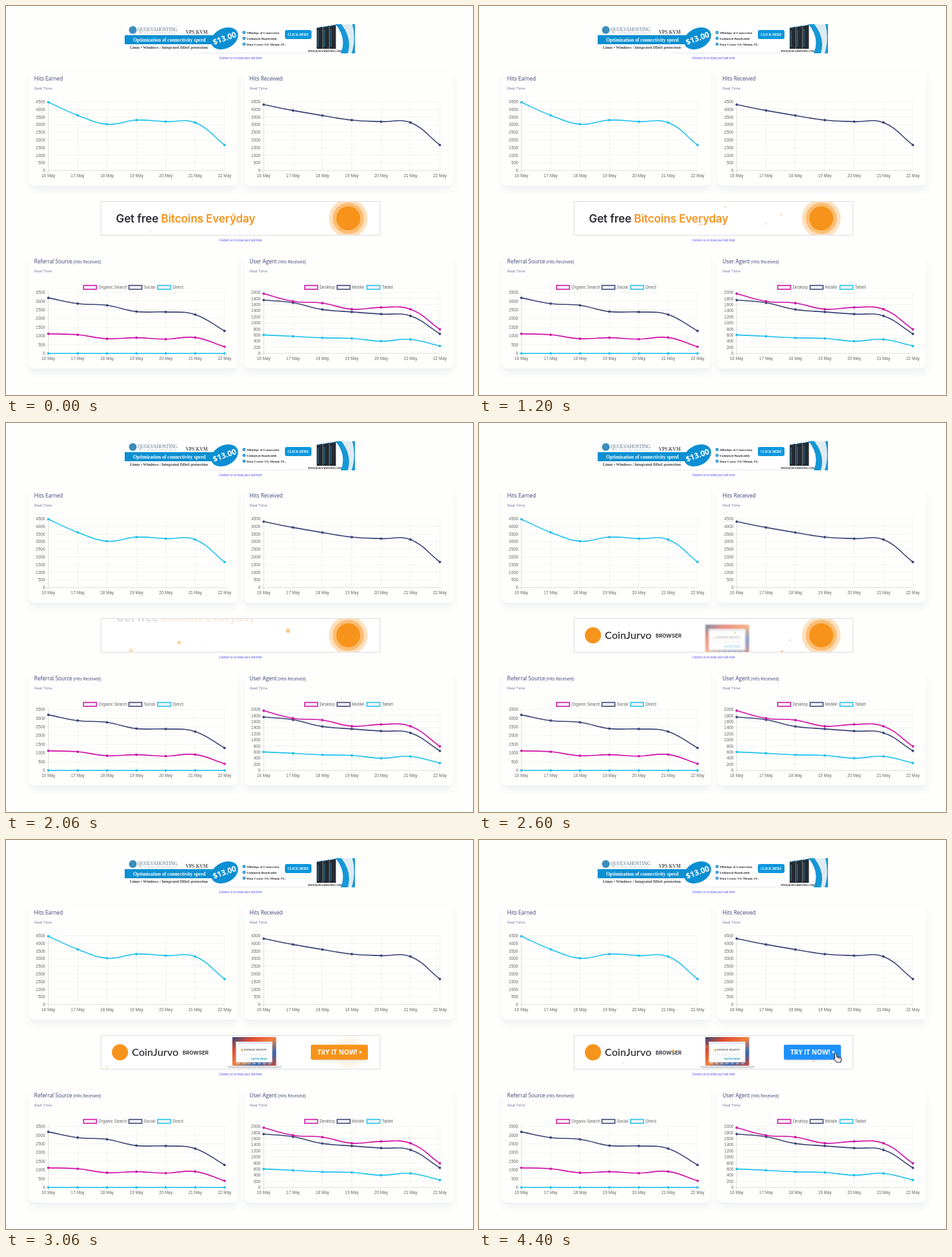
Recreate the animation shown at these times as an HTML page. Size 720x600 px, loop 4460 ms.

```html
<!DOCTYPE html>
<html lang="en">
<head>
<meta charset="utf-8">
<title>Traffic dashboard</title>
<style>
  html, body { margin: 0; width: 100%; height: 100%; overflow: hidden; background: #fefefc; }
  svg { display: block; }
  text { white-space: pre; }
  .ui { font-family: "Open Sans", sans-serif; }
  .title { font-size: 8.2px; font-weight: 500; fill: #3a4374; }
  .title tspan { font-size: 6.3px; }
  .tick { font-family: "Liberation Sans", Arial, sans-serif; font-size: 6.4px; fill: #666; }
  .serif { font-family: "Liberation Serif", serif; font-weight: 700; }
  .link { font: italic 4.5px "Open Sans", sans-serif; fill: #3c3cf5; text-anchor: middle; }
  .lead { font: 600 17px Inter, sans-serif; letter-spacing: -.1px; }
</style>
</head>
<body>
<svg width="720" height="600" viewBox="0 0 720 600">
  <defs>
    <filter id="soft" x="-10%" y="-10%" width="120%" height="125%">
      <feDropShadow dx="0" dy="7" stdDeviation="5" flood-color="#54609c" flood-opacity=".085"/>
    </filter>
    <filter id="blur"><feGaussianBlur id="blurAmount" stdDeviation="0"/></filter>
    <clipPath id="adClip"><rect x="147" y="302" width="429" height="51"/></clipPath>
    <clipPath id="topClip"><rect x="183" y="28" width="355" height="45"/></clipPath>
    <linearGradient id="screen" x1="0" y1="0" x2="1" y2="1">
      <stop offset="0" stop-color="#2b4a7e"/><stop offset=".25" stop-color="#e04a32"/>
      <stop offset=".5" stop-color="#f0823c"/><stop offset=".75" stop-color="#2f68b0"/>
      <stop offset="1" stop-color="#d8432f"/>
    </linearGradient>
  </defs>

  <g id="cards" fill="#fefefd" filter="url(#soft)"></g>

  <g clip-path="url(#topClip)">
    <rect x="183" y="28" width="355" height="45" fill="#fff"/>
    <path d="M297 72.600H476" stroke="#ddd" stroke-width=".8"/>
    <circle cx="195.500" cy="37" r="6" fill="#3c8dbb"/>
    <rect x="183" y="45" width="142" height="14" fill="#0c8fd1"/>
    <g class="serif" fill="#3d3d45">
      <text x="203" y="38.500" font-size="7.300" font-weight="400" fill="#587286">QUOLVAHOSTING</text>
      <text x="203" y="42" font-size="2.700" font-weight="400" fill="#687680">VIRTUAL AND DEDICATED SERVER SOLUTIONS</text>
      <text x="277" y="42.500" font-size="7.400" fill="#555">VPS KVM</text>
      <text x="196" y="54.700" font-size="7.550" fill="#fff">Optimization of connectivity speed</text>
      <text x="191" y="65.800" font-size="6">Linux • Windows / Integrated DDoS protection</text>
    </g>
    <ellipse cx="337" cy="50" rx="22" ry="15.500" fill="#0b8fd3" transform="rotate(-27 337 50)"/>
    <text class="ui" x="337" y="54" font-size="12" font-weight="700" fill="#fff" text-anchor="middle" transform="rotate(-20 337 50)">$13.00</text>
    <g id="perks" class="serif" font-size="5" fill="#25252c"></g>
    <rect x="430" y="37" width="41" height="14" rx="3" fill="#0d97dc"/>
    <text class="serif" x="450.500" y="45.800" font-size="5.100" fill="#fff" text-anchor="middle">CLICK HERE</text>
    <path d="M508 28H538V73H518Q528 50 508 28Z" fill="#dfebf2"/>
    <path d="M508 28H517Q534 50 527 73H516Q526 50 508 28ZM534 28H538V73H533Q540 50 534 28Z" fill="#1797d6"/>
    <g id="racks"></g>
    <text class="serif" x="491" y="70.500" font-size="3.500" fill="#111" text-anchor="middle">WWW.QUOLVAHOSTING.COM</text>
  </g>
  <text class="link" x="361.700" y="81.500">Contact us to show your ads here</text>
  <text class="link" x="361.700" y="362.700">Contact us to show your ads here</text>

  <g id="charts"></g>

  <rect x="146.500" y="301.500" width="430" height="52" fill="#fff" stroke="#dcdcdc"/>
  <g clip-path="url(#adClip)">
    <text id="lead" class="lead" x="169.500" y="333.500" fill="#2a2a33">Get free <tspan fill="#f7941d">Bitcoins Everyday</tspan></text>

    <g id="brand">
      <circle cx="175.700" cy="327.500" r="12.500" fill="#f7941d"/>
      <text x="194" y="333.300" font-family="Lato, sans-serif" font-size="16.200" font-weight="500" fill="#25252d">CoinJurvo</text>
      <text x="272.300" y="331" font-family="Inter, sans-serif" font-size="8" font-weight="600" fill="#25252d">BROWSER</text>
    </g>

    <g id="laptop">
      <g filter="url(#blur)">
        <rect x="349" y="304" width="67.500" height="44" rx="1" fill="url(#screen)"/>
        <rect x="354.500" y="311" width="56" height="32" fill="#fbfbfc"/>
        <rect x="354.500" y="311" width="56" height="3.500" fill="#e3e8f1"/>
        <circle cx="364" cy="324" r="1.500" fill="#f7941d"/>
        <text class="ui" x="367" y="325.400" font-size="3.600" font-weight="700" fill="#777">BROWSER BENEFITS</text>
        <path d="M362 331H402" stroke="#e4e4e8" stroke-width=".8"/>
        <text class="ui" x="378" y="338.700" font-size="3.600" font-weight="700" fill="#28a5c5">FASTER PAGES</text>
        <path d="M356 345H409" stroke="#e8edf5" stroke-width="1.200" stroke-dasharray="5 3"/>
      </g>
      <path id="base" d="M340 348.500H426Q425 352 418 352H348Q341 352 340 348.500Z" fill="#d5d7db"/>
    </g>

    <g id="coin">
      <g id="halo">
        <circle r="29.800" fill="#fde0bd"/>
        <circle r="24" fill="#fbbd74"/>
      </g>
      <circle id="core" r="18.500" fill="#f7931a"/>
    </g>

    <g id="button">
      <rect x="-43" y="-10" width="87" height="23" rx="2" opacity=".12"/>
      <rect id="face" x="-44" y="-11.500" width="88" height="23" rx="2"/>
      <text class="ui" x="-34" y="3.600" font-size="10" font-weight="700" fill="#fff">TRY IT NOW!</text>
      <path d="M31 -2.200L35 0L31 2.200Z" fill="#fff"/>
    </g>

    <g id="dots" fill="#f9a94b"></g>

    <path id="hand" d="M3 0Q4.500 0 4.500 1.500V5.500L10 6.800Q12 7.300 12 9.500L10.500 14.500H4.500L.500 9.500Q-.500 7.500 1.500 8V1.500Q1.500 0 3 0ZM6.800 6V8.500M9.200 6.600V8.800"
      fill="#ececee" stroke="#2c2c33" stroke-width="1.100" stroke-linejoin="round"/>
  </g>
</svg>
<script>
const $ = id => document.getElementById(id);
const CYAN = '#1cc1ee', NAVY = '#3a4374', PINK = '#cf0fa5';

function add(parent, tag, attrs, content) {
  const node = document.createElementNS('http://www.w3.org/2000/svg', tag);
  for (const key in attrs) node.setAttribute(key, attrs[key]);
  if (content !== undefined) node.textContent = content;
  parent.appendChild(node);
  return node;
}

for (const x of [36, 368])
  for (const [y, height] of [[101, 176], [386, 173]])
    add($('cards'), 'rect', { x, y, width: 321, height, rx: 8 });

['100mbps of Connection', 'Unlimited Bandwidth', 'Data Center US, Miami, FL.'].forEach((label, i) => {
  const y = 41 + i * 8.9;
  add($('perks'), 'circle', { cx: 367, cy: y, r: 2.4, fill: '#0d86c6' });
  add($('perks'), 'path', { d: `M366.3 ${y - 1.2}l1.7 1.2l-1.7 1.2z`, fill: '#fff' });
  add($('perks'), 'text', { x: 371, y: y + 1.7 }, label);
});

for (let i = 0; i < 3; i++) {
  const x = 479 + i * 10, top = 34 - i * 1.5;
  add($('racks'), 'path', { d: `M${x} ${top}l9.6 -2V66H${x}z`, fill: '#232a32' });
  add($('racks'), 'path', { d: `M${x} ${top}l9.6 -2M${x + 2} ${top + 4}V63`, stroke: '#3a86ad' });
}

// Smooth curve with control points along each neighbour chord.
function curve(pts, tension = .4) {
  const ctl = pts.map((p, i) => {
    const a = pts[i - 1] || p, b = pts[i + 1] || p;
    const da = Math.hypot(p[0] - a[0], p[1] - a[1]), db = Math.hypot(b[0] - p[0], b[1] - p[1]);
    const at = k => [p[0] + k * (b[0] - a[0]), p[1] + k * (b[1] - a[1])];
    return { before: at(-tension * da / (da + db)), after: at(tension * db / (da + db)) };
  });
  return 'M' + pts[0] + pts.slice(1).map((p, i) => `C${ctl[i].after} ${ctl[i + 1].before} ${p}`).join('');
}

function chart({ x, top, bottom, max, step, title, note, legend = [], series }) {
  const g = add($('charts'), 'g', {}), gap = 45.27, right = x + gap * 6;
  const line = (d, strong) =>
    add(g, 'path', { d, stroke: strong ? '#c8c8cc' : '#ececef', 'stroke-width': .6 });
  const toY = v => bottom - v / max * (bottom - top);
  const head = top < 300 ? 114.8 : 396.8;

  const h = add(g, 'text', { class: 'ui title', x: x - 21.7, y: head }, title);
  if (note) add(h, 'tspan', {}, ' ' + note);
  add(g, 'text', { class: 'ui', x: x - 21.5, y: head + 14.2, 'font-size': 5.95, fill: '#68749f' }, 'Real Time');

  for (let v = 0; v <= max; v += step) {
    const y = toY(v);
    line(`M${x - 5} ${y}H${right}`, !v);
    add(g, 'text', { class: 'tick', x: x - 5, y: y + 2.3, 'text-anchor': 'end' }, v);
  }
  for (let i = 0; i < 7; i++) {
    const cx = x + i * gap;
    line(`M${cx} ${top}V${bottom + 4}`, !i);
    add(g, 'text', { class: 'tick', x: cx, y: bottom + 10.4, 'text-anchor': 'middle' }, `${16 + i} May`);
  }
  for (const [lx, label, stroke] of legend) {
    add(g, 'rect', { x: lx, y: 431, width: 20, height: 6, fill: '#f3f3f5', stroke, 'stroke-width': 1.5 });
    add(g, 'text', { class: 'tick', x: lx + 23, y: 436.3 }, label);
  }
  for (const [color, values] of series) {
    const pts = values.map((v, i) => [x + i * gap, toY(v)]);
    add(g, 'path', { d: curve(pts), fill: 'none', stroke: color, 'stroke-width': 1.6 });
    for (const [cx, cy] of pts) add(g, 'circle', { cx, cy, r: 1.9, fill: color });
  }
}

// Daily hits per device and from social; the other series follow from these.
const desktop = [1960, 1710, 1650, 1450, 1510, 1450, 790];
const mobile = [1750, 1660, 1440, 1360, 1290, 1230, 640];
const tablet = [605, 560, 510, 490, 400, 460, 240];
const social = [3190, 2860, 2760, 2400, 2380, 2230, 1290];
const received = desktop.map((v, i) => v + mobile[i] + tablet[i]);
const organic = received.map((v, i) => v - social[i]);
const earned = [4470, 3610, 3030, ...received.slice(3)];

const left = 65.3, right = 397.3;
const upper = { top: 147.7, bottom: 253.8, max: 4500, step: 500 };
const lower = { top: 441.8, bottom: 535.8, note: '(Hits Received)' };
chart({ ...upper, x: left, title: 'Hits Earned', series: [[CYAN, earned]] });
chart({ ...upper, x: right, title: 'Hits Received', series: [[NAVY, received]] });
chart({
  ...lower, x: left, max: 3500, step: 500, title: 'Referral Source',
  legend: [[119.5, 'Organic Search', PINK], [189.5, 'Social', NAVY], [233.7, 'Direct', CYAN]],
  series: [[CYAN, social.map(() => 0)], [NAVY, social], [PINK, organic]]
});
chart({
  ...lower, x: right, max: 2000, step: 200, title: 'User Agent',
  legend: [[460.5, 'Desktop', PINK], [510.5, 'Mobile', NAVY], [556.5, 'Tablet', CYAN]],
  series: [[CYAN, tablet], [NAVY, mobile], [PINK, desktop]]
});

const LOOP = 4460, TICK = 200 / 3, LIFE = 900, DOTS = 30;

let seed = 11;
const random = () => (seed = seed * 16807 % 2147483647) / 2147483647;
for (let i = 0; i < 5; i++) random();

// Small coins, born at even intervals, that fall and fade.
const dots = Array.from({ length: DOTS }, (_, i) => {
  const r = 1.2 + 3.3 * random() ** 4;
  return {
    birth: i * LOOP / DOTS,
    y: 296 + 28 * random(),
    node: add($('dots'), 'circle', { cx: 155 + 390 * random(), r })
  };
});

const clamp = v => Math.min(1, Math.max(0, v));
const ramp = (t, a, b) => clamp((t - a) / (b - a));
const out = p => 1 - (1 - p) ** 2;
const mix = (a, b, p) => a + (b - a) * p;
const set = (id, name, value) => $(id).setAttribute(name, value);
function place(id, x, y, scale = 1, opacity = 1) {
  set(id, 'transform', `translate(${x} ${y}) scale(${scale})`);
  set(id, 'opacity', opacity);
}

function draw(ms) {
  const t = Math.floor((ms + 6.67) / TICK) * TICK;

  const leave = ramp(t, 1800, 2130);
  place('lead', 0, -34 * leave, 1, 1 - leave);

  const enter = out(ramp(t, 2130, 2470));
  place('brand', 0, 24 * (1 - enter), 1, enter);

  const open = ramp(t, 2460, 2800);
  place('laptop', 0, 12 * (1 - open), 1, clamp(open * 1.5));
  set('blurAmount', 'stdDeviation', 1.6 * (1 - open));
  set('base', 'opacity', ramp(t, 2660, 2870));

  const shrink = ramp(t, 2660, 2930);
  place('coin', 527.7, 327.5);
  place('halo', 0, 0, 1 - .1 * shrink, 1 - out(ramp(t, 2660, 3330)));
  place('core', 0, 0, 1 - shrink, 1 - shrink);

  const grow = out(ramp(t, 2700, 2970));
  place('button', 514, 327.3, grow, grow);
  const hover = ramp(t, 3530, 3670);
  set('face', 'fill', `rgb(${mix(247, 30, hover)},${mix(147, 144, hover)},${mix(26, 255, hover)})`);

  const reach = out(ramp(t, 3200, 4000));
  place('hand', mix(566, 547, reach), mix(354, 328.5, reach), 1, t > 3200 ? 1 : 0);

  for (const { birth, y, node } of dots) {
    const age = (t - birth + LOOP) % LOOP / LIFE;
    node.setAttribute('cy', y + 50 * age);
    node.setAttribute('opacity', age < 1 ? .6 * clamp(3 * (1 - age)) * clamp(5 * age) : 0);
  }
}

const start = performance.now();
function frame() {
  draw((performance.now() - start) % LOOP);
  requestAnimationFrame(frame);
}
frame();
</script>
</body>
</html>
```
